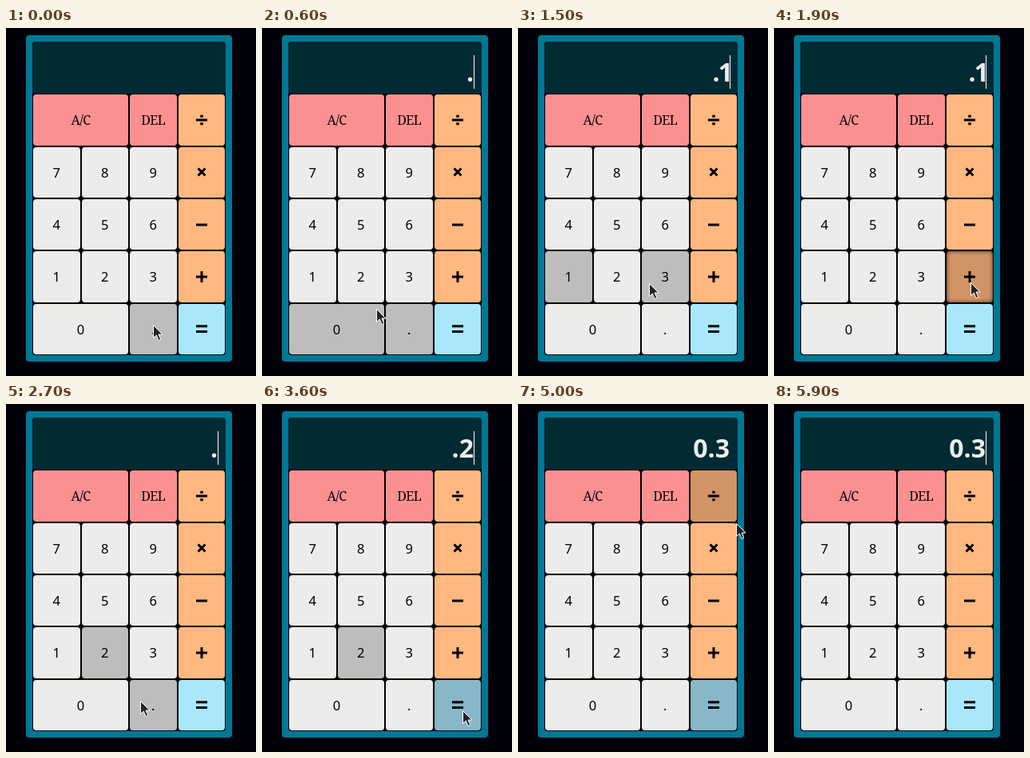
An HTML page that plays this animation: 313x435 px, repeating every 6 s.

```html
<!DOCTYPE html>
<html lang="en">
<head>
<meta charset="utf-8">
<title>Calculator</title>
<style>
html, body { margin: 0; width: 100%; height: 100%; overflow: hidden; background: #00000b; }
#stage { position: relative; width: 313px; height: 435px; overflow: hidden; }
#frame { position: absolute; left: 25px; top: 9px; width: 258px; height: 408px; border-radius: 4px; background: #007894; }
#grid {
  position: absolute; left: 33px; top: 17px; width: 242px; height: 392px;
  display: grid; grid-template: repeat(6, 1fr) / repeat(4, 1fr);
  background: #00000b; border-radius: 4px;
}
#display { grid-column: span 4; background: #012b33; border-radius: 4px; }
.key {
  display: flex; align-items: center; justify-content: center; margin: 1px;
  border-radius: 4px; background: #ecedea; color: #000;
  font: 16.5px "Noto Sans", sans-serif;
}
.wide { grid-column: span 2; }
.red { background: #fb9090; font: 16px "Noto Serif", serif; letter-spacing: -.5px; }
.orange { background: #ffb880; }
.blue { background: #aae7fb; }
.dark { background: #bdbdbd; }
.orange.dark { background: #d29366; }
.blue.dark { background: #88b7c8; }
.pressed { box-shadow: inset 0 0 5px #000b; }
.key svg { width: 16px; height: 16px; fill: none; stroke: #000; stroke-width: 3; }
#value {
  position: absolute; right: 48px; top: 39px; white-space: pre; color: #ecedea;
  font: bold 32px/32px "Noto Sans", sans-serif;
}
#caret { position: absolute; left: 265px; top: 34px; width: 1px; height: 42px; background: #fff; }
#pointer { position: absolute; left: 0; top: 0; width: 14px; height: 21px; overflow: visible; fill: #252525; stroke: #fff; }
</style>
</head>
<body>
<div id="stage">
  <div id="frame"></div>
  <div id="grid"><div id="display"></div></div>
  <div id="value"></div>
  <div id="caret"></div>
  <svg id="pointer"><path d="M.5 .5V16.5L4.3 13L7 19.5L9.8 18.3L7 12H12Z"/></svg>
</div>
<script>
const LOOP = 6000, TICK = 100;
const $ = id => document.getElementById(id);

const symbols = {
  "÷": "M1 8H15M6.2 3.2H9.8M6.2 12.8H9.8",
  "×": "M3.5 3.5L12.5 12.5M12.5 3.5L3.5 12.5",
  "−": "M1 8H15",
  "+": "M1 8H15M8 1V15",
  "=": "M1 4.8H15M1 11.4H15"
};

const keys = {};
for (const label of "A/C DEL ÷ 7 8 9 × 4 5 6 − 1 2 3 + 0 . =".split(" ")) {
  const key = document.createElement("div");
  key.className = "key";
  if (label === "A/C" || label === "0") key.classList.add("wide");
  if (label === "A/C" || label === "DEL") key.classList.add("red");
  if (symbols[label]) {
    key.classList.add(label === "=" ? "blue" : "orange");
    key.setAttribute("aria-label", label);
    key.innerHTML = `<svg><path d="${symbols[label]}"/></svg>`;
  } else {
    key.textContent = label;
  }
  keys[label] = key;
  $("grid").append(key);
}

// Time spans in ms, [from, to)
const dark = {
  ".": [[0, 1100], [2400, 3100]],
  "0": [[600, 700]],
  "1": [[800, 1800]],
  "2": [[700, 800], [1400, 1500], [2700, 4000]],
  "3": [[1500, 1700]],
  "+": [[1700, 2700], [4600, 5000]],
  "=": [[2100, 2200], [3400, 5900]],
  "÷": [[5000, 5200]]
};
const pressed = { "1": [[1100, 1300]], "+": [[1800, 2000]], "=": [[4000, 4300]] };
const caret = [[500, 1000], [1500, 2000], [2500, 3100], [3600, 4300], [4500, 5000], [5500, 6000]];

const values = [[0, ""], [500, "."], [1100, ".1"], [2700, "."], [3100, ".2"], [4300, "0.3"]];

// Pointer moves: start, end, x, y; equal times are jumps
const start = [184, 371];
const moves = [
  [400, 900, 82, 320], [1300, 1700, 246, 318],
  [1900, 2200, 212, 352], [2300, 2500, 184, 371],
  [2700, 2700, 168, 371], [2900, 2900, 122, 325], [3100, 3100, 118, 313],
  [3200, 3400, 237, 372], [3600, 3600, 251, 383],
  [4300, 4800, 265, 300], [5000, 5000, 273, 149], [5100, 5400, 288, 22]
];

const within = (spans, t) => (spans || []).some(([from, to]) => t >= from && t < to);

function pointerAt(t) {
  let [x, y] = start;
  for (const [from, to, nextX, nextY] of moves) {
    if (t < from) break;
    const p = to > from ? Math.min(1, (t - from) / (to - from)) : 1;
    x += (nextX - x) * p;
    y += (nextY - y) * p;
  }
  return [Math.round(x), Math.round(y)];
}

function draw(t) {
  for (const label in keys) {
    keys[label].classList.toggle("dark", within(dark[label], t));
    keys[label].classList.toggle("pressed", within(pressed[label], t));
  }
  const text = values.filter(([from]) => t >= from).pop()[1];
  const value = $("value");
  value.textContent = text;
  // Close the gap around the narrow digit
  value.style.letterSpacing = value.style.marginRight = text === ".1" ? "-2px" : "0";
  $("caret").style.visibility = within(caret, t) ? "visible" : "hidden";
  const [x, y] = pointerAt(t);
  $("pointer").style.transform = `translate(${x}px, ${y}px)`;
  $("pointer").style.visibility = t < 5500 ? "visible" : "hidden";
}

const origin = performance.now();
function tick() {
  const t = Math.max(0, performance.now() - origin) % LOOP;
  draw(Math.floor(t / TICK) * TICK);
  requestAnimationFrame(tick);
}
tick();
</script>
</body>
</html>
```
